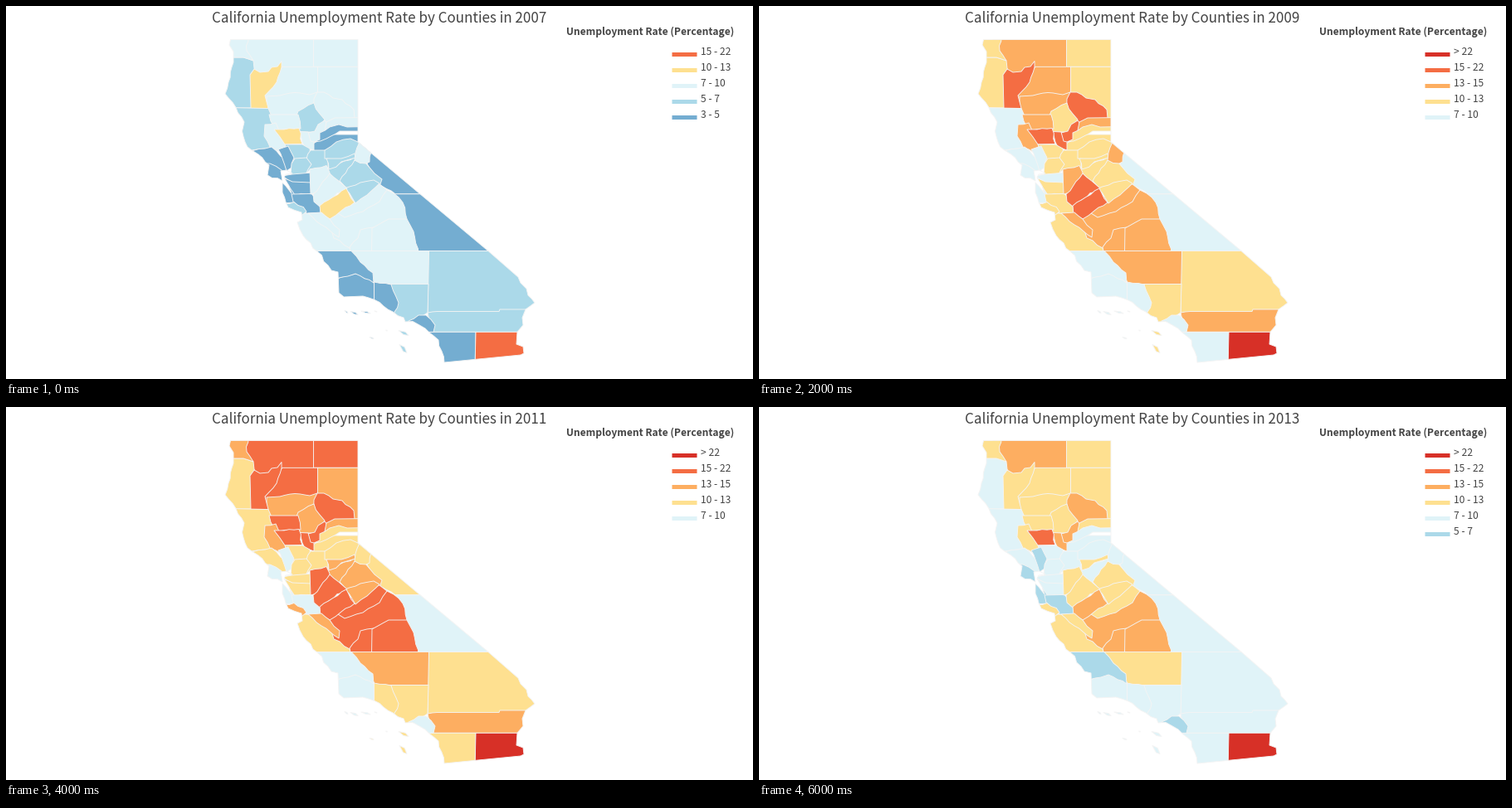
Animation, 900 px wide and 450 px high, one loop 7000 ms. Source, as a matplotlib script:

```python
import numpy as np
import matplotlib.pyplot as plt
from matplotlib.animation import FuncAnimation
from matplotlib.patches import Polygon

FONT = "Noto Sans CJK JP"
INK = "#444444"
EDGE = "#f4f4f4"
COLORS = ["#74add1", "#abd9e9", "#e0f3f8", "#fee090", "#fdae61", "#f46d43", "#d73027"]
LABELS = ["3 - 5", "5 - 7", "7 - 10", "10 - 13", "13 - 15", "15 - 22", "> 22"]
FIRST_YEAR, YEARS = 2007, 7
TOP, KERN_TOP, BASE = 73.3, 295.5, 393.3  # straight east-west county lines

rng = np.random.default_rng(4)
fig = plt.figure(figsize=(12.5, 6.25), dpi=72, facecolor="white")
ax = fig.add_axes([0, 0, 1, 1])
ax.set(xlim=(0, 900), ylim=(450, 0))
ax.axis("off")


def roughen(corners):
    """Roughen short slanted edges like rivers and ridges; surveyed lines stay straight."""
    out = []
    for a, b in zip(corners, np.roll(corners, -1, axis=0)):
        out.append(a)
        step = b - a
        length = np.hypot(*step)
        if np.abs(step).min() < 1.5 or length > 45:
            continue
        normal = np.array([-step[1], step[0]]) / length
        n = int(length // 6)
        out += [a + step * k / n + normal * rng.normal(0, 0.7) for k in range(1, n)]
    return np.array(out)


def shape(*xy):
    return Polygon(roughen(np.reshape(xy, (-1, 2))), lw=0.9, ec=EDGE,
                   joinstyle="round", snap=False)


coast = shape(
    270.5, 40.5, 424, 40.5, 424, 164, 581, 295.5, 617, 327, 620, 334, 627, 341,
    629, 349, 637, 358, 626, 366, 622, 376, 623, 385, 616, BASE, 615, 408, 623, 411,
    624, 419, 620, 421, 528, 430, 521, 403, 505, 389, 490, 380.5, 481, 381, 479, 376,
    460, 366, 444, 354.5, 430, 350, 407, 351, 401, 346, 400, 321, 392, 319, 375, 296,
    358, 277, 351, 261, 357, 258, 356, 249, 340, 243, 333, 225, 333, 213, 337, 217,
    344, 226, 341, 217, 335, 207, 337, 203, 345, 202, 338, 198, 331, 199, 333, 211,
    315, 204, 317, 192, 304, 179, 296, 174, 288, 164, 284.5, 151, 287, 140, 277, 122.5,
    264, 106, 268, 92, 274, 68, 274, 55, 269, 47)
coast.set(facecolor="none", zorder=2)
ax.add_patch(coast)

areas = []


def add(rates, patch):
    areas.append((patch, [int(r) for r in rates]))
    ax.add_patch(patch)


def county(rates, *xy):
    """Paint a county with one rate class per year.

    The coast trims it and later counties cover it, so hidden sides stay rough.
    """
    patch = shape(*xy)
    add(rates, patch)
    patch.set_clip_path(coast)


def island(rates, x, y, w, h):
    add(rates, shape(x - w / 2, y - h / 2, x + w / 5, y - h / 5,
                     x + w / 2, y + h / 2, x, y + h / 3))


# Northern rim
county("2345554", 280, 30, 371, 30, 371, 90, 290, 90)  # Siskiyou
county("2235543", 370.5, 30, 440, 30, 440, TOP, 370.5, TOP)  # Modoc
county("2234433", 375.5, TOP, 440, TOP, 440, 140, 375.5, 140)  # Lassen
county("2345543", 333, TOP, 375.5, TOP, 375.5, 120, 312, 120, 312, 100)  # Shasta
county("2245443", 314, 109, 330, 108, 348, 104.5, 366, 107, 375, 104,
       375, 135, 314, 135)  # Tehama
county("1233322", 250, 62, 286, 62, 298, 66, 299, 75, 310, 90, 310, 123, 250, 123)  # Humboldt
county("3355543", 295, 123.5, 294, 83, 299, 76, 306, 80, 316, 79, 320, 74, 327, 73,
       332, 66.5, 332, 74, 326, 92, 312, 108, 316, 123.5)  # Trinity
county("2234443", 260, 30, 292, 30, 290, 54, 298, 66, 286, 62, 260, 62)  # Del Norte
county("1123322", 265, 122.5, 316, 123.5, 330, 150, 330, 175, 312, 172,
       296, 174, 270, 174)  # Mendocino

# Sacramento Valley
county("2355554", 375, 104, 383, 104, 394, 111, 405, 113, 419, 125, 420, 135,
       400, 142, 370, 142, 371, 112)  # Plumas
county("1234433", 350, 132, 352, 127, 371, 117, 378, 130, 384, 137, 372, 152,
       353, 152)  # Butte
county("2355554", 364, 153, 372, 151, 376, 143, 384, 138, 390, 146, 380, 165,
       366, 167)  # Yuba
county("2345443", 386, 140, 396, 135, 440, 134.5, 440, 150, 384, 150)  # Sierra
county("0133322", 371, 178, 370, 166, 386, 155, 440, 155, 440, 172, 384, 180)  # Placer
county("0133322", 371, 164, 378, 161, 378, 153, 390, 146, 401, 143, 411, 146,
       440, 145.5, 440, 151, 402, 151, 386, 160)  # Nevada
county("2355554", 354, 151.5, 364, 152, 367, 163, 371, 164, 371, 174, 360, 170)  # Sutter
county("2345543", 317, 131, 352, 131, 355, 148, 325, 150, 319, 139)  # Glenn
county("2345433", 312, 143, 325, 141, 338, 167, 333, 178, 318, 170, 311, 157)  # Lake
county("3455555", 323, 149, 353, 147.5, 357, 166.5, 336, 167, 330, 158)  # Colusa
county("1233332", 336, 167, 357, 167, 366, 172, 368, 190, 345, 190)  # Yolo
county("1233332", 367, 174, 388, 174, 388, 195, 367, 197, 360, 203, 362, 185)  # Sacramento

# Bay Area and Monterey Bay
county("0123322", 290, 174, 312, 172, 320, 170, 338, 185, 340, 200, 310, 200)  # Sonoma
county("0123221", 328, 173, 340, 169, 347, 183, 344, 195, 338, 199, 333, 184)  # Napa
county("1133332", 344, 190, 348, 184, 362, 183, 368, 191, 361, 203, 343, 204)  # Solano
county("0022211", 310, 190, 318, 190, 332, 198, 336, 206, 333, 214, 310, 210)  # Marin
county("0133322", 335, 208, 345, 211, 368, 212, 368, 226.5, 343, 228)  # Alameda
county("0123322", 333, 205, 345, 203, 368, 201, 367, 213, 345, 212)  # Contra Costa
county("0022211", 325, 212, 337, 212, 348, 228, 347, 237, 330, 239)  # San Mateo
county("2233333", 345, 250, 365, 250, 385, 262, 414, 291, 416, 300, 345, 300)  # Monterey
county("0133221", 344, 227, 368, 226.5, 379, 241, 380, 250, 362, 250, 346, 236)  # Santa Clara
county("1234433", 335, 238, 347, 236.5, 362, 248, 357, 252, 335, 250)  # Santa Cruz

# Sierra Nevada
county("1234432", 388, 196, 421, 182, 421, 192, 402, 213, 388, 205)  # Calaveras
county("1133332", 384, 174, 398, 164, 415, 160, 424, 164, 430, 168, 420, 182,
       400, 185, 384, 184)  # El Dorado
county("1234433", 386, 184, 404, 184, 420, 178, 421, 183, 404, 188, 389, 197)  # Amador
county("0123332", 425, 165, 520, 226.8, 469, 226.8, 448, 214, 436, 192)  # Mono
county("1235433", 402, 211, 412, 196, 420, 186, 433, 189, 444, 202, 453, 209,
       448, 220, 410, 221)  # Tuolumne
county("2343332", 427, 160, 440, 176, 438, 188, 434, 190, 420, 186, 421, 177)  # Alpine
county("0122222", 467, 226.8, 520, 226.8, 600, KERN_TOP, 490, KERN_TOP, 467, 240)  # Inyo

# San Joaquin Valley
county("2345554", 459, 222, 467, 226, 478, 237, 483, 257, 440, 290, 414, 292,
       395, 280, 385, 250, 415, 235)  # Fresno
county("2345544", 414, 291, 424, 280, 427, 270, 443, 267, 443, 300, 416, 300)  # Kings
county("2345554", 440.5, 300, 441, 268, 461, 257, 483, 257, 491, 272, 497, 300)  # Tulare
county("2245543", 400, 250, 415, 230, 450, 215, 459, 222, 450, 236, 430, 248,
       408, 255)  # Madera
county("1233433", 408, 220, 427, 213, 443, 210, 450, 214, 435, 228, 421, 238)  # Mariposa
county("2345543", 366, 197, 386, 192.5, 392, 207, 378, 224, 367, 227)  # San Joaquin
county("2355543", 370, 227, 390, 202, 411, 220, 378, 242, 371, 236)  # Stanislaus
county("3355554", 378, 241, 410, 220, 420, 237, 404, 247, 390, 257, 379, 252)  # Merced
county("2245433", 364, 250, 380, 249, 390, 257, 402, 270, 401, 279, 380, 264)  # San Benito

# South
county("2245443", 410, KERN_TOP, 509.5, KERN_TOP, 509.5, 335.5, 430, 335.5)  # Kern
county("0122222", 390, 331, 421, 323, 443.5, 332, 443.5, 365, 390, 360)  # Santa Barbara
county("0123221", 360, KERN_TOP, 416, KERN_TOP, 427, 309, 442, 322, 443, 334,
       421, 323, 412, 326, 385, 330)  # San Luis Obispo
county("1234332", 509.5, KERN_TOP, 660, KERN_TOP, 660, 375, 508, 375)  # San Bernardino
county("1233332", 464, 335.5, 509, 335.5, 508, 370, 495, 377, 480, 390, 467, 380)  # Los Angeles
county("0123322", 443.5, 333, 464, 336, 473, 358, 467, 375, 443.5, 365)  # Ventura
county("1244432", 508, 370, 520, 368.5, 594, 368.5, 595, 366, 640, 366, 640, BASE,
       513, BASE)  # Riverside
county("0123322", 505, BASE, 566, BASE, 565, 435, 505, 435)  # San Diego
county("0122221", 485, 380, 497, 373, 506, 373, 517, 385, 515, BASE, 495, BASE)  # Orange
county("5666666", 566, BASE, 640, BASE, 640, 440, 565, 440)  # Imperial

# Channel Islands
island("0122222", 410, 369, 4, 3)
island("0122222", 419.5, 370.5, 9, 4)
island("0122222", 433.5, 369.5, 11, 3)
island("0123322", 445.5, 368.5, 3, 1)
island("0123322", 440.5, 400.5, 5, 2)
island("0122222", 458.5, 391.5, 1.5, 1)
island("1233332", 479, 394.5, 12, 6)
island("1233332", 478.5, 413.5, 9, 10)


def write(x, y, text, size, **style):
    return ax.text(x, y, text, size=size, family=FONT, color=INK, va="baseline", **style)


title = write(450, 20, "", 17, ha="center")
write(776.5, 35, "Unemployment Rate (Percentage)", 12, ha="center", weight="bold")

keys = []
for row in range(6):
    y = 57.5 + 19 * row
    bar, = ax.plot([802, 832], [y, y], lw=5, solid_capstyle="butt")
    keys.append((bar, write(837, y + 1.7, "", 12)))


def update(i):
    for patch, rates in areas:
        patch.set_facecolor(COLORS[rates[i]])
    title.set_text(f"California Unemployment Rate by Counties in {FIRST_YEAR + i}")
    used = sorted({rates[i] for _, rates in areas}, reverse=True)
    for row, (bar, label) in enumerate(keys):
        shown = row < len(used)
        bar.set_visible(shown)
        label.set_visible(shown)
        if shown:
            bar.set_color(COLORS[used[row]])
            label.set_text(LABELS[used[row]])
    return []


anim = FuncAnimation(fig, update, frames=YEARS, interval=1000, repeat=True, repeat_delay=0)
plt.show()
```
